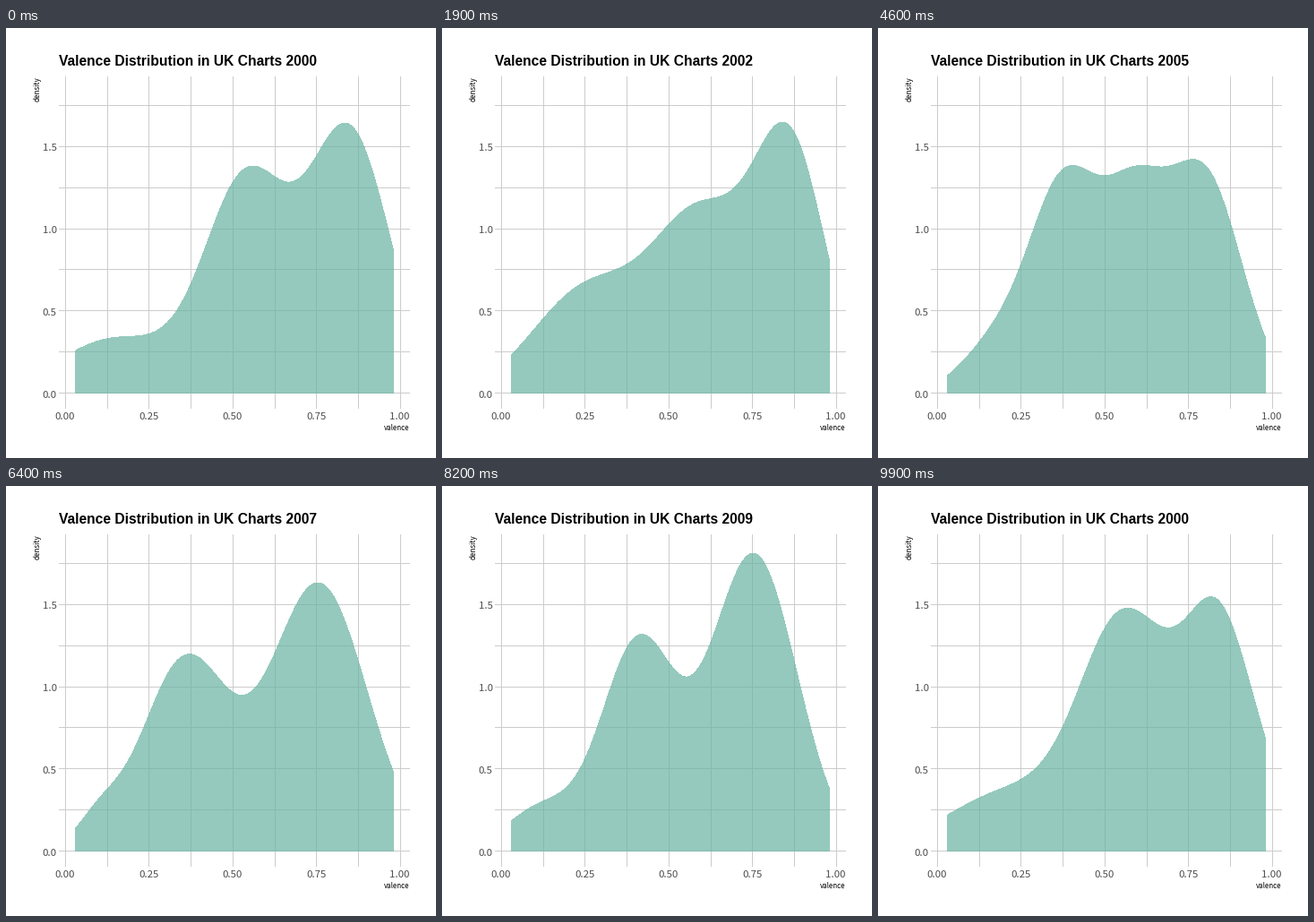
Write a matplotlib script that moves like this. It is 480 px wide and 480 px high and loops after 10 s.

```python
import numpy as np
import matplotlib.pyplot as plt
from matplotlib.animation import FuncAnimation

SIZE, DPI = 480, 100
PX = 72 / DPI
FRAMES, INTERVAL = 100, 100

# Panel and scales, in pixels from the top left
LEFT, RIGHT, TOP, BOTTOM = 59, 450, 54, 424
X0, X_UNIT = 66, 373.6
Y0, Y_UNIT = 407.25, 183.7

# Each density is a sum of bells: centre, spread, height
BELLS = {
    2000: [(.15, .17, .33), (.543, .125, 1.29), (.85, .12, 1.57)],
    2002: [(.255, .16, .62), (.6, .145, 1.05), (.865, .105, 1.42)],
    2004: [(.14, .1, .235), (.395, .115, .62), (.73, .18, 1.7)],
    2005: [(.17, .1, .27), (.38, .105, 1.25), (.59, .095, 1.0),
           (.8, .11, 1.3)],
    2007: [(.1, .065, .16), (.36, .13, 1.16), (.758, .143, 1.62)],
    2009: [(.12, .105, .26), (.41, .11, 1.26), (.755, .128, 1.8)],
    2010: [(.29, .14, .57), (.6, .15, 1.73), (.83, .07, .7)],
}
FIRST, LAST = min(BELLS), max(BELLS)

valence = np.linspace(.03, .98, 712)


def density(year):
    """Sum the year's bells, or average the years on both sides."""
    if year not in BELLS:
        return (density(year - 1) + density(year + 1)) / 2
    return sum(height * np.exp(-((valence - centre) / spread) ** 2 / 2)
               for centre, spread, height in BELLS[year])


curves = [density(year) for year in range(FIRST, LAST + 1)]

# First frame of each change and its number of steps
STARTS = [5, 15, *range(25, FRAMES, 9)]
STEPS = [5 if start < 25 else 4 for start in STARTS]


def state_at(frame):
    """Return the density curve and the year shown in the title."""
    for i, (start, steps) in enumerate(zip(STARTS, STEPS)):
        progress = max(0, (frame - start + 1) / steps)
        if progress < 1:
            j = (i + 1) % len(curves)
            curve = (1 - progress) * curves[i] + progress * curves[j]
            return curve, FIRST + (j if progress >= .5 else i)


fig = plt.figure(figsize=(SIZE / DPI, SIZE / DPI), dpi=DPI, facecolor="white")
ax = fig.add_axes([0, 0, 1, 1])
ax.set(xlim=(0, SIZE), ylim=(SIZE, 0))
ax.axis("off")


def label(x, y, text, size, color="black", font="Noto Sans CJK JP", **style):
    return ax.text(x, y, text, fontsize=size * PX, color=color, family=font,
                   va="baseline", **style)


# Whole coordinates: one-pixel lines snap to the pixel that starts there
grid = dict(color="#cccccc", lw=PX, antialiased=False, zorder=1)
ax.vlines(np.round(X0 + X_UNIT / 8 * np.arange(9)), TOP, BOTTOM, **grid)
ax.hlines(np.round(Y0 - Y_UNIT / 4 * np.arange(8)), LEFT, RIGHT, **grid)

for value in np.arange(5) / 4:
    label(X0 + X_UNIT * value, 437, f"{value:.2f}", 11.4, "#4d4d4d",
          ha="center")
for value in np.arange(4) / 2:
    label(56.5, Y0 - Y_UNIT * value + 5.5, f"{value:.1f}", 11.4, "#4d4d4d",
          ha="right")

label(RIGHT, 449, "valence", 7.9, ha="right")
label(37.5, TOP, "density", 8.1, rotation=90, ha="right",
      rotation_mode="anchor")
title = label(59, 42, "", 15.6, font="Liberation Sans", weight="bold")

xs = X0 + X_UNIT * valence
area, = ax.fill([0], [0], color="#69b3a2", alpha=.7, lw=0,
                antialiased=False, zorder=2)


def update(frame):
    curve, year = state_at(frame)
    top = np.column_stack([xs, Y0 + .5 - Y_UNIT * curve])
    area.set_xy(np.vstack([[xs[0], Y0], top, [xs[-1], Y0]]))
    title.set_text(f"Valence Distribution in UK Charts {year}")
    return area, title


anim = FuncAnimation(fig, update, frames=FRAMES, interval=INTERVAL,
                     repeat=True, repeat_delay=0)
plt.show()
```
